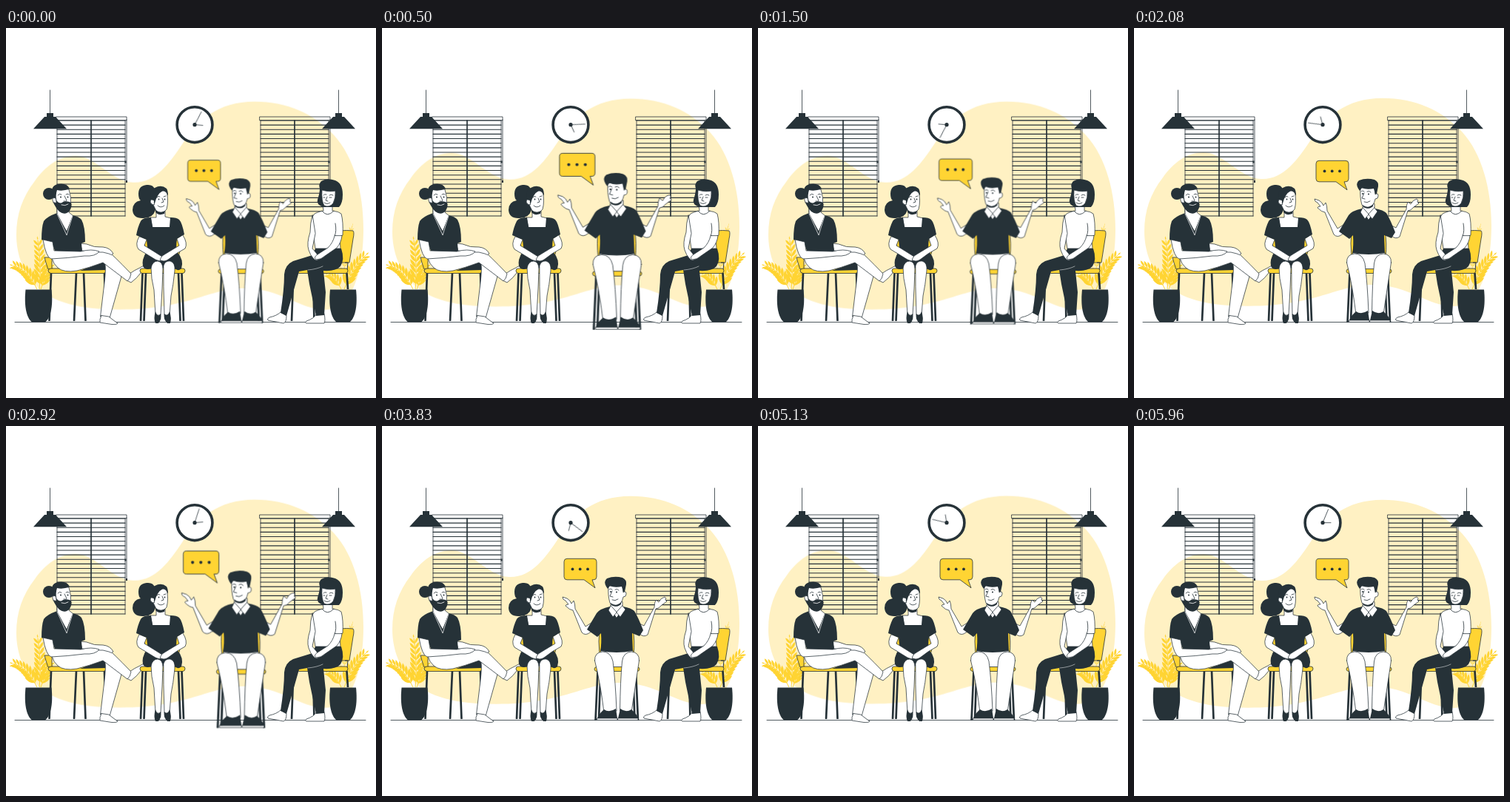
An HTML page for the animation above (6000 ms loop, 500 by 500 pixels).

```html
<!DOCTYPE html>
<html lang="en">
<head>
<meta charset="utf-8">
<title>Group talk</title>
<style>
html, body { margin: 0; width: 100%; height: 100%; overflow: hidden; background: #fff; }
svg { display: block; width: 100%; height: 100%; }
.d { fill: #263238; stroke: none; }
.w { fill: #fff; stroke: #263238; stroke-width: .75; stroke-linejoin: round; stroke-linecap: round; }
.y { fill: #ffd433; stroke: #263238; stroke-width: .8; stroke-linejoin: round; }
.l { fill: none; stroke: #263238; stroke-width: .8; stroke-linecap: round; stroke-linejoin: round; }
.leg { fill: none; stroke: #263238; stroke-width: 2.7; }
.slat { stroke-width: 1.1; }
.tape { stroke-width: 1.7; }
.frond { fill: #ffd433; stroke: none; }
.stem { fill: none; stroke: #ffd433; stroke-width: 1; }
.blob { fill: #fff1c3; }
#speaker { transform-origin: 315px 290.5px; }
#hands { transform-origin: 255px 130.7px; }
</style>
</head>
<body>
<svg viewBox="0 0 500 500" xmlns="http://www.w3.org/2000/svg">
  <path id="blob" class="blob" d="M14 280C14 252 22 229 39 207C53 187 72 173 94 173C121 173 143 208 172 209C202 210 221 183 239 156C259 125 286 99.7 336 99.7C380 99.7 417 116 444 146C470 175 483 222 483 272C483 318 472 381 432 381C396 381 372 352 322 352C274 352 247 380.7 154 380.7C101 380.7 62 372 39 347C22 329 14 304 14 280Z"/>
  <path class="l" d="M12 397.5H486"/>

  <g id="windows"></g>
  <g id="lamps"></g>

  <g id="clock">
    <circle cx="255" cy="130.7" r="23.9" fill="#fff" stroke="#263238" stroke-width="3.6"/>
    <g id="hands">
      <path class="l" d="M255 130.7L262.500 112.700M255 130.7H266"/>
    </g>
    <circle class="d" cx="255" cy="130.7" r="2.6"/>
  </g>

  <g id="plants"></g>

  <g id="beard-man">
    <path class="leg" d="M61 331L58.500 396M95 331L92 396M105 331L107.500 396M133 331L135 396"/>
    <path class="y" d="M52 310H62V326H57Q54 318 52 310Z"/>
    <path class="y" d="M61 325H132Q135 325 135 328T132 331.500H61Q57 331 57 328T61 325Z"/>
    <path class="d" d="M100 328L133 316L136 327Z"/>
    <path class="w" d="M134 319Q135 327 133 344L127.500 390L140 392L157 332L145 315Z"/>
    <path class="w" d="M129 388.500L139 390Q145 395 151 399Q150 401 143 400.500L127 398Q126 394 129 388.500Z"/>
    <path class="w" d="M167 332Q174 327 181 324Q187 320 190 321Q188 324 182 331Q177 338 169 344L163 341Z"/>
    <path class="w" d="M62 311L100 299Q126 294 136 300Q144 306 169 332Q168 339 164 342L131 317Q112 324 96 328Q78 331 70 324Q64 319 62 311Z"/>
    <path class="w" d="M101 291L109 292Q119 297 131 296Q141 297 145 305Q143 308 139 305L131 303Q116 304 103 301Z"/>
    <path class="w" d="M69 243V254L82 275L91 254L85 249V243Z"/>
    <path class="d" d="M69 250Q55 255 51 261Q48 269 48 286L62 290L66 301Q84 306 103 305L102 291L107 289Q107 268 102 259Q99 255 90 253L82 275Z"/>
    <path class="l" d="M69 251L82 280L90 254" style="stroke:#fff;stroke-width:.7"/>
    <path class="w" d="M50 286L63 289L65 301L101 302Q116 298 126 302Q121 309 106 308Q83 311 61 312Q54 310 50 286Z"/>
    <circle class="d" cx="58" cy="224" r="8"/>
    <path class="w" d="M66 218H85Q89 229 87 242Q78 251 70 244L64 236Z"/>
    <path class="d" d="M62 226Q60 213 70 211Q82 209 86 217Q77 221 69 219Q67 225 68 233Q73 239 77 235Q83 233 88 236Q90 240 86 247Q80 254 72 248Q64 241 62 226Z"/>
    <path class="w" d="M67 230Q62 228 63 233Q64 237 68 236Z"/>
    <path class="l" d="M79 227L82 233Q81 235 78 234M70 226Q72 223 75 225M81 225Q83 223 85 225"/>
    <circle class="d" cx="74" cy="228.500" r="1"/><circle class="d" cx="83.500" cy="228.500" r="1"/>
    <path class="l" d="M75 239Q80 241 84 238" style="stroke:#fff"/>
  </g>

  <g id="bun-woman">
    <path class="leg" d="M184.500 331L182 396M189 331L186.500 396M233 331L235.500 396M237.500 331L240 396"/>
    <path class="y" d="M187 282Q186 296 191 309H233Q237 297 236 281Z"/>
    <path class="y" d="M184 325H239Q242 325 242 328T239 331.500H184Q181 331 181 328T184 325Z"/>
    <path class="d" d="M190 302H231Q241 314 237 325Q232 330 227 324H199Q189 329 185 322Q183 313 190 302Z"/>
    <path class="w" d="M213 321Q215 314 222 315Q229 317 228 328Q226 348 223 362L221 388H214L213 350Z"/>
    <path class="w" d="M196 324Q198 315 205 315Q212 316 212 326L211 352L209 388H202L200 354Q196 338 196 324Z"/>
    <path class="d" d="M202 383Q205 392 209 386Q211 393 206 399H202Q199 393 202 383ZM214 386Q218 391 221 383Q224 392 222 399H218Q212 393 214 386Z"/>
    <path class="w" d="M203 245V256H195L198 270H222L223 257L215 255V245Z"/>
    <path class="d" d="M196 256Q185 256 182 261Q178 269 176 280L190 286L191 296Q190 302 189 307H232Q229 299 231 285L241 279Q238 263 234 259Q231 256 222 256L221 269H198Z"/>
    <path class="w" d="M180 282Q174 292 179 299Q189 305 202 313Q207 316 212 314L211 309Q200 302 187 294L190 286Z"/>
    <path class="w" d="M239 280Q246 291 242 298Q230 304 219 313Q213 317 208 313L211 308Q219 303 234 294L231 285Z"/>
    <path class="d" d="M201 218Q199 211 190 212Q179 213 179 224Q179 231 182 233Q171 235 171 246Q172 257 184 257Q198 258 202 246Z"/>
    <path class="w" d="M200 220H217Q220 234 217 245Q211 253 203 247L198 237Z"/>
    <path class="d" d="M197 238Q192 219 201 216Q210 211 217 217Q219 220 219 227Q217 221 212 220Q204 224 201 237Z"/>
    <path class="w" d="M200 233Q195 230 195 235Q196 239 200 239Z"/>
    <path class="d" d="M202 246Q208 251 215 247L214 251Q206 254 202 249Z"/>
    <path class="l" d="M211 230L213 235L210 236M204 229Q206 226 208 228M213 228L216 227M205 240Q209 244 214 240"/>
    <circle class="d" cx="206.500" cy="231.500" r=".9"/><circle class="d" cx="214.500" cy="231.500" r=".9"/>
  </g>

  <g id="bob-woman">
    <path class="leg" d="M388.500 331L386 396M415 331L416.500 396M460.500 331L462 353"/>
    <path class="y" d="M451 274Q461 273 469 274Q471 276 469 285L464 317H447Z"/>
    <path class="leg" d="M458 317H462L461 327" style="stroke-width:1"/>
    <path class="y" d="M396 325H459Q462 325 462 328T459 331.500H396Q393 331 393 328T396 325Z"/>
    <path class="w" d="M371 384Q366 389 356 391Q352 393 354 395L375 399Q379 398 379 389ZM420 386Q416 393 406 396Q403 399 407 399H430Q432 396 430 386Z"/>
    <path class="d" d="M418 298H453Q458 313 452 322Q446 329 429 328Q431 348 432 357L430 388L419 389L410 346L407 327L396 329L379 389L371 385Q376 353 376 333Q377 320 388 315L414 307Z"/>
    <path class="l" d="M408 327Q420 326 428 322" style="stroke:#fff;stroke-width:.5"/>
    <path class="w" d="M428 238L429 247Q419 249 416 252Q412 257 414 270L418 298H452L451 282L455 280Q456 262 453 251Q450 248 441 247V239Z"/>
    <path class="l" d="M427 247Q434 257 443 247M445 264Q447 275 444 281L451 282"/>
    <path class="w" d="M414 253Q411 264 411 276Q406 291 409 300Q411 307 416 312Q420 316 423 312L420 305L414 298L418 278Z"/>
    <path class="w" d="M444 281Q442 290 435 297L421 306Q415 310 419 313Q426 313 431 308L447 297Q453 290 454 281Z"/>
    <path class="d" d="M426 207Q434 202 445 206Q455 210 455 225Q455 237 450 242H429Q419 239 421 232Q424 223 424 217Q422 211 426 207Z"/>
    <path class="w" d="M427 219Q437 222 445 220Q446 229 442 237Q437 243 430 240Q426 234 427 219Z"/>
    <path class="l" d="M434 228L432 233L435 234M429 226Q430 224 433 225M437 226Q439 224 442 226M430 236Q434 239 438 236M429 229H431M437 229H440"/>
    <path class="d" d="M424 215Q434 221 447 220L446 237L452 235L451 213L435 208Z"/>
  </g>

  <g id="speaker">
    <path class="leg" d="M291.500 331L288.500 398M295.500 331L293 396M339 331L341.500 396M343 331L346 398"/>
    <path class="y" d="M294 275Q292 290 294 309H340Q342 290 339 275Z"/>
    <path class="w" d="M296 303H339V327H296Z"/>
    <path class="y" d="M290 325.500H345Q348 326 348 328.500T345 331.500H290Q287 331 287 328.500T290 325.500Z"/>
    <path class="w" d="M287.500 317Q287 306 298 305Q309 305 312 318Q315.500 345 317 385L300 387Q295 346 287.500 317Z"/>
    <path class="w" d="M347.500 317Q348 306 337 305Q326 306 324.500 318Q322 345 321.500 385L337 387Q343 346 347.500 317Z"/>
    <path class="d" d="M300 383Q307 388 316 382L318 395H291Q292 390 300 383ZM322 382Q330 388 337 383Q345 390 346 395H319Z"/>
    <path class="w" d="M291 395H318V397.500H291ZM319 395H346V397.500H319Z"/>
    <path class="w" d="M283 266L275 271L261 247Q261 240 259 236L256 240Q254 235 250 233L244 231Q244 235 248 236L252 241Q248 241 248 243Q254 249 258 249L270 279Q275 284 281 279L291 276ZM348 267L354 270L368 245Q368 239 370 235L374 238Q377 232 382 231Q385 232 383 235L385 237L378 242Q374 247 370 247L359 282Q354 286 348 281L341 275Z"/>
    <path class="w" d="M309 238V245L305 248L315 261L329 247L325 244V238Z"/>
    <path class="d" d="M308 244Q294 247 290 253Q284 263 277 275L291 285L296 280Q297 294 295 304Q317 308 339 304L338 280L348 284L353 276Q346 258 341 250Q337 246 326 244L317 259Z"/>
    <path class="w" d="M309 243L306 249L312 258L317 252ZM325 243L329 248L322 258L317 252Z"/>
    <path class="w" d="M306 216H325L326 225Q330 222 330 227Q330 231 326 231Q324 240 319 243Q311 244 308 239Q305 229 306 216Z"/>
    <path class="d" d="M303 217Q299 210 304 206Q314 202 325 205Q331 208 330 214L328 224H326L324 217Q314 219 308 216L305 220Z"/>
    <path class="d" d="M309 239Q316 245 323 238L323 241Q317 246 310 242Z"/>
    <path class="l" d="M311 223L308 230L312 231M307 221Q308 219 311 221M315 221Q318 219 320 222M311 235Q315 237 319 234"/>
    <circle class="d" cx="309" cy="224" r="1"/><circle class="d" cx="317" cy="224.500" r="1"/>
    <path class="y" d="M250 179.300H286Q290 179.300 290 183.300V203.800Q290 207.800 286 207.800H284L288 218.800L273 207.800H250Q246 207.800 246 203.800V183.300Q246 179.300 250 179.300Z"/>
    <circle class="d" cx="257.500" cy="193.400" r="1.900"/><circle class="d" cx="267.700" cy="193.400" r="1.900"/><circle class="d" cx="278" cy="193.400" r="1.900"/>
  </g>
</svg>
<script>
const $ = id => document.getElementById(id);
const path = (cls, d) => `<path class="${cls}" d="${d}"/>`;

// Blinds: header, slats, middle tape and pull cord
function blinds(x) {
  let slats = '';
  for (let i = 0; i < 22; i++) slats += `M${x + 1} ${125 + i * 6.14}h92`;
  return path('l', `M${x} 120h95v4.800h-95z`) +
    path('l slat', slats) +
    path('l tape', `M${x + 47} 125v129`) +
    path('l', `M${x + 1} 125v129M${x + 93} 125v129M${x + 95} 124v84`) +
    path('d', `M${x + 92.500} 179.500h2v3h-2zM${x + 94} 206h2v3h-2z`);
}

function lamp(x) {
  return path('l', `M${x} 84v32`) +
    path('d', `M${x - 4.500} 115h9v5h3l15 16.300h-45l15-16.300h3z`);
}

const pot = x =>
  path('d', `M${x - 17.500} 353.500h35c2 19 0 37-8.500 44h-18c-8.500-7-10.500-25-8.500-44z`);

// A curved stem with pairs of pointed leaflets that shrink towards the tip
function frond(x0, y0, cx, cy, x1, y1, size, n = 9) {
  const leaf = (x, y, a, len) => {
    const p = (r, t) => `${(x + Math.cos(a + t) * r).toFixed(1)} ${(y + Math.sin(a + t) * r).toFixed(1)}`;
    return `M${p(0, 0)}Q${p(len * .6, -.5)} ${p(len, 0)}Q${p(len * .6, .5)} ${p(0, 0)}`;
  };
  let d = '';
  for (let i = 1; i <= n; i++) {
    const t = i / n, u = 1 - t;
    const x = u * u * x0 + 2 * u * t * cx + t * t * x1;
    const y = u * u * y0 + 2 * u * t * cy + t * t * y1;
    const a = Math.atan2(u * (cy - y0) + t * (y1 - cy), u * (cx - x0) + t * (x1 - cx));
    const len = size * (1.1 - t * .5);
    d += i < n ? leaf(x, y, a - .6, len) + leaf(x, y, a + .6, len) : leaf(x, y, a, len * .6);
  }
  return path('stem', `M${x0} ${y0}Q${cx} ${cy} ${x1} ${y1}`) + path('frond', d);
}

$('windows').innerHTML = blinds(68) + blinds(343);
$('lamps').innerHTML = lamp(59.500) + lamp(449.500);
$('plants').innerHTML =
  frond(42, 353, 30, 326, 10, 321, 15) +
  frond(45, 353, 48, 320, 43, 287, 16) +
  frond(47, 353, 53, 335, 60, 320, 13, 7) +
  frond(457, 353, 467, 324, 486, 307, 16) +
  `<g opacity=".6">${frond(456, 340, 458, 300, 468, 267, 9)}</g>` +
  frond(453, 353, 447, 338, 435, 333, 13, 6) +
  pot(44) + pot(455.500);

// Every part starts slightly into its cycle
const loop = (id, duration, frames) =>
  $(id).animate(frames, { duration, delay: -40, iterations: Infinity, easing: 'linear' });

loop('blob', 1500, [0, -6, 0].map(y => ({ transform: `translateY(${y}px)` })));
loop('hands', 3000, [0, 360].map(a => ({ transform: `rotate(${a}deg)` })));

const beats = [[0, 1], [.1, 1.1], [.3, 1], [.4, 1], [.5, 1.1], [.6, 1], [1, 1]];
loop('speaker', 6000, beats.map(([offset, s]) => ({ offset, transform: `scale(${s})` })));
</script>
</body>
</html>
```
